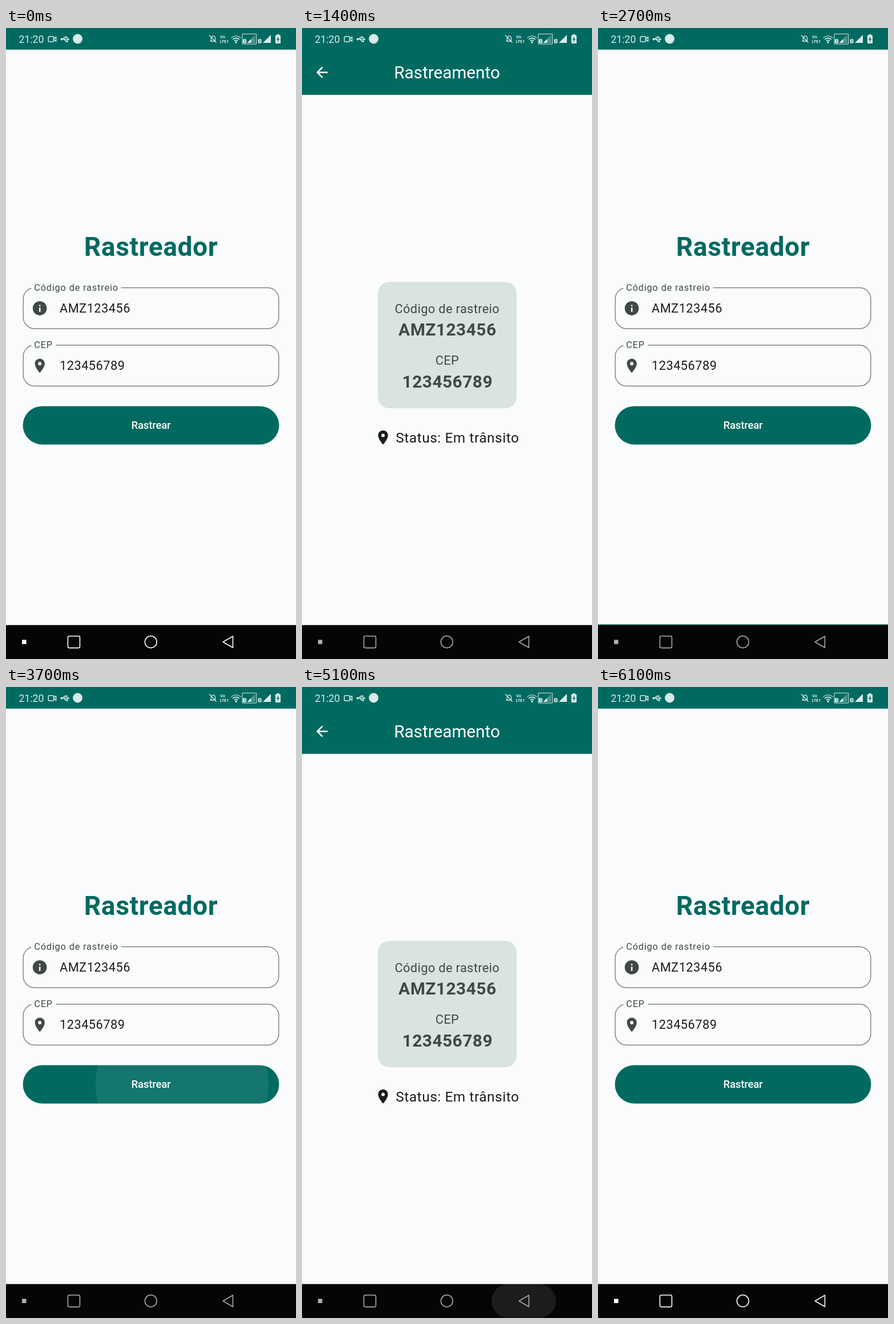
An HTML page with a canvas that plays this animation: 508 px wide and 1102 px high, repeating every 7400 ms.

```html
<!DOCTYPE html>
<html lang="pt-BR">
<head>
<meta charset="utf-8">
<title>Rastreador</title>
<style>
html, body { margin: 0; width: 100%; height: 100%; overflow: hidden; background: #fafbfd; }
canvas { display: block; width: 508px; height: 1102px; }
</style>
</head>
<body>
<canvas id="stage" width="508" height="1102"></canvas>
<script>
const ctx = document.getElementById('stage').getContext('2d');
const W = 508, H = 1102, TOP = 37.7, BOTTOM = 1042.7, BAR = 79, DP = 1.2345;
const LOOP = 7400, STEP = 100, SLIDE = 700;
const TEAL = '#006a61', BG = '#fafbfd', INK = '#191c1b', SOFT = '#3f4947', STATUS = '#d9ebe9';

// Screen changes: the detail page enters or leaves.
const moves = [
  { at: 683.1, enter: true }, { at: 2032.4, enter: false },
  { at: 3850.2, enter: true }, { at: 5350, enter: false }
];
const buttonTaps = [{ down: 478, up: 684 }, { down: 3652, up: 3850 }];
const arrowTap = { down: 1870, up: 2032 };

const PIN = new Path2D('M12 2C8.13 2 5 5.13 5 9c0 5.25 7 13 7 13s7-7.75 7-13c0-3.87-3.13-7-7-7z' +
  'm0 9.5c-1.38 0-2.5-1.12-2.5-2.5s1.12-2.5 2.5-2.5 2.5 1.12 2.5 2.5-1.12 2.5-2.5 2.5z');
const INFO = new Path2D('M12 2C6.48 2 2 6.48 2 12s4.48 10 10 10 10-4.48 10-10S17.52 2 12 2z' +
  'm1 15h-2v-6h2v6zm0-8h-2V7h2v2z');
const ARROW = new Path2D('M20 11H7.83l5.59-5.59L12 4l-8 8 8 8 1.41-1.41L7.83 13H20v-2z');

const clamp = v => Math.max(0, Math.min(1, v));

// Cubic Bezier (0.4, 0, 0.2, 1), solved by bisection.
function ease(x) {
  if (x <= 0 || x >= 1) return clamp(x);
  let lo = 0, hi = 1, s = 0.5;
  for (let i = 0; i < 24; i++) {
    s = (lo + hi) / 2;
    const px = 1.2 * (1 - s) ** 2 * s + 0.6 * (1 - s) * s * s + s ** 3;
    if (px < x) lo = s; else hi = s;
  }
  return s * s * (3 - 2 * s);
}

function text(str, x, y, size, { weight = 400, color = INK, spacing = 0, align = 'left' } = {}) {
  ctx.font = `${weight} ${size}px Roboto, sans-serif`;
  ctx.letterSpacing = spacing + 'px';
  ctx.textAlign = align;
  ctx.fillStyle = color;
  ctx.fillText(str, x, y);
}

function box(x, y, w, h, r = 0) {
  ctx.beginPath();
  ctx.roundRect(x, y, w, h, r);
}

function fillBox(color, ...rect) {
  ctx.fillStyle = color;
  box(...rect);
  ctx.fill();
}

function disc(color, x, y, r) {
  ctx.fillStyle = color;
  ctx.beginPath();
  ctx.arc(x, y, r, 0, Math.PI * 2);
  ctx.fill();
}

function poly(...pts) {
  ctx.beginPath();
  for (let i = 0; i < pts.length; i += 2) ctx.lineTo(pts[i], pts[i + 1]);
}

function icon(path, cx, cy, color) {
  ctx.save();
  ctx.translate(cx - 12 * DP, cy - 12 * DP);
  ctx.scale(DP, DP);
  ctx.fillStyle = color;
  ctx.fill(path, 'evenodd');
  ctx.restore();
}

function ripple(t, tap, from, to, startR, endR) {
  const age = t - tap.down;
  const alpha = 0.12 * clamp(age / 75) * (1 - clamp((t - tap.up) / 150));
  if (alpha <= 0) return;
  const k = clamp(age / 225);
  disc(`rgba(255,255,255,${alpha})`, from[0] + (to[0] - from[0]) * k,
    from[1] + (to[1] - from[1]) * k, startR + (endR - startR) * ease(k));
}

function field(y, label, gapEnd, value, glyph) {
  ctx.save();
  ctx.beginPath();
  ctx.rect(0, y - 10, W, 100);
  ctx.rect(44.5, y - 8, gapEnd - 44.5, 16);
  ctx.clip('evenodd');
  ctx.strokeStyle = '#6c7073';
  ctx.lineWidth = 1.25;
  box(30.2, y, 447.6, 71.4, 19.7);
  ctx.stroke();
  ctx.restore();
  text(label, 49.2, y + 5.4, 16.3, { color: SOFT, spacing: 0.85 });
  icon(glyph, 59.2, y + 36, SOFT);
  text(value, 94, y + 43.4, 21.7, { spacing: 0.52 });
}

function home(t, alpha) {
  text('Rastreador', 254, 398, 46.1, { weight: 700, color: TEAL, spacing: 0.6, align: 'center' });
  field(453.6, 'Código de rastreio', 201.8, 'AMZ123456', INFO);
  field(553.9, 'CEP', 87.4, '123456789', PIN);
  ctx.save();
  fillBox(TEAL, 29.6, 660.4, 448.8, 67, 33.5);
  ctx.clip();
  for (const tap of buttonTaps) ripple(t, tap, [323, 694], [254, 694], 135, 239);
  ctx.restore();
  text('Rastrear', 254, 700, 18.5, { weight: 500, color: '#fff', spacing: -0.15, align: 'center' });
  // A veil of background fades the whole page as one layer.
  ctx.globalAlpha = 1 - alpha;
  fillBox(BG, 0, TOP, W, BOTTOM - TOP);
  ctx.globalAlpha = 1;
}

function detail(t, offset) {
  ctx.save();
  ctx.translate(0, offset);
  fillBox(BG, 0, TOP, W, BOTTOM - TOP);
  // At rest the bar joins the status bar without a seam.
  const barTop = offset ? TOP : 0;
  fillBox(TEAL, 0, barTop, W, TOP + BAR - barTop);
  ripple(t, arrowTap, [35, 77.5], [35, 77.5], 15, 24.7);
  icon(ARROW, 35, 77.5, '#fff');
  text('Rastreamento', 254, 88, 29.7, { color: '#fff', align: 'center' });

  fillBox('#d9e3e1', 133, 443.6, 243, 220.4, 19.7);
  const bold = { weight: 700, color: SOFT, spacing: 0.52, align: 'center' };
  const plain = { color: SOFT, spacing: 0.4, align: 'center' };
  text('Código de rastreio', 254.3, 497.6, 21.7, plain);
  text('AMZ123456', 254.8, 537.2, 29.8, bold);
  text('CEP', 254.5, 587.8, 21.7, plain);
  text('123456789', 254.8, 627.6, 29.8, bold);
  icon(PIN, 142, 715.2, INK);
  text('Status: Em trânsito', 164.2, 723.6, 24.3, { spacing: 0.6 });
  ctx.restore();
}

function signal(right, strength, color) {
  poly(right, 12, right, 26, right - 14, 26);
  ctx.closePath();
  ctx.fillStyle = 'rgba(217,235,233,.35)';
  ctx.fill();
  const s = 14 * strength;
  poly(right - 14, 26, right - 14 + s, 26 - s, right - 14 + s, 26);
  ctx.fillStyle = color;
  ctx.fill();
}

function statusBar() {
  fillBox(TEAL, 0, 0, W, TOP);
  text('21:20', 22.4, 26, 17.7, { color: STATUS });
  ctx.strokeStyle = STATUS;
  ctx.lineWidth = 1.5;
  ctx.lineJoin = 'round';

  // Camera
  box(74.2, 15, 9.2, 9, 1);
  ctx.stroke();
  poly(84, 18.6, 87.6, 15.6, 87.6, 23.4, 84, 20.4);
  ctx.stroke();

  // USB
  poly(98, 19.5, 108, 19.5);
  ctx.stroke();
  poly(100, 19.5, 102.5, 16, 105.5, 16);
  ctx.stroke();
  poly(102, 19.5, 104.5, 23, 107, 23);
  ctx.stroke();
  disc(STATUS, 97.5, 19.5, 2);
  disc(STATUS, 106, 16, 1.6);
  fillBox(STATUS, 105.6, 21.6, 3, 3);
  poly(107.5, 17.3, 111.5, 19.5, 107.5, 21.7);
  ctx.fill();

  disc(STATUS, 125.5, 19, 8.4);

  // Muted bell
  ctx.lineWidth = 1.3;
  poly(358, 23, 359.5, 21, 359.5, 17, 362, 14.2, 365, 14.2, 366.5, 17, 366.5, 23);
  ctx.closePath();
  ctx.stroke();
  poly(356, 12.5, 368.5, 25.5);
  ctx.stroke();

  const tiny = { weight: 700, color: STATUS };
  text('Vo', 375, 18, 7.6, tiny);
  text('LTE1', 374.5, 25.6, 7.2, tiny);

  // Wi-Fi
  ctx.lineWidth = 1.8;
  [11.5, 7.8, 4.2].forEach((r, i) => {
    ctx.strokeStyle = i ? STATUS : 'rgba(217,235,233,.55)';
    ctx.beginPath();
    ctx.arc(403, 25.5, r, -Math.PI * 0.76, -Math.PI * 0.24);
    ctx.stroke();
  });
  disc(STATUS, 403, 25, 1.8);

  // SIM signals
  ctx.strokeStyle = STATUS;
  ctx.lineWidth = 1;
  ctx.strokeRect(414, 10.5, 24.5, 17.5);
  signal(436.5, 0.5, STATUS);
  signal(464, 1, STATUS);
  for (const [x, n] of [[415, '1'], [441.5, '2']]) {
    fillBox(STATUS, x, 19.5, 6, 7, 1);
    text(n, x + 1.5, 25.4, 6, { weight: 700, color: TEAL });
  }

  // Charging battery
  fillBox(STATUS, 474.5, 11, 4, 3);
  fillBox(STATUS, 471.8, 12.5, 9.2, 14.5, 1.2);
  poly(477, 15, 474, 20.5, 476, 20.5, 475.5, 25, 479, 18.8, 477, 18.8);
  ctx.fillStyle = TEAL;
  ctx.fill();
}

function navBar(t) {
  fillBox('#050407', 0, BOTTOM, W, H - BOTTOM);
  if (t >= 5100) {
    const glow = 0.09 * (1 - clamp((t - 5200) / 400));
    fillBox(`rgba(255,255,255,${glow})`, 332, BOTTOM, 113, 59, 29.5);
  }
  const dim = t >= 5200 ? 0 : clamp((t - 260) / 400);
  const level = Math.round(255 - 83 * dim);
  const color = `rgb(${level},${level},${level})`;
  fillBox(color, 28, 1068.5, 7.6, 7.6, 1);
  ctx.strokeStyle = color;
  ctx.lineWidth = 1.6;
  ctx.lineJoin = 'round';
  box(108.4, 1062, 21, 20.6, 2.5);
  ctx.stroke();
  ctx.beginPath();
  ctx.arc(253.7, 1072.2, 10.4, 0, Math.PI * 2);
  ctx.stroke();
  poly(380.2, 1072.2, 397.4, 1062.2, 397.4, 1082.2);
  ctx.closePath();
  ctx.stroke();
}

// How much of the detail page is in view, from 0 to 1.
function shownAt(t) {
  let shown = 0;
  for (const { at, enter } of moves) {
    if (t < at) break;
    const k = ease((t - at) / SLIDE);
    shown = enter ? k : 1 - k;
  }
  return shown;
}

function draw(t) {
  const shown = shownAt(t);
  fillBox(BG, 0, 0, W, H);
  if (shown < 1) home(t, 1 - shown);
  if (shown > 0) detail(t, (BOTTOM - TOP) * (1 - shown));
  statusBar();
  navBar(t);
}

const start = performance.now();
function tick() {
  const t = (performance.now() - start) % LOOP;
  draw(Math.floor(t / STEP) * STEP);
  requestAnimationFrame(tick);
}
tick();
</script>
</body>
</html>
```
